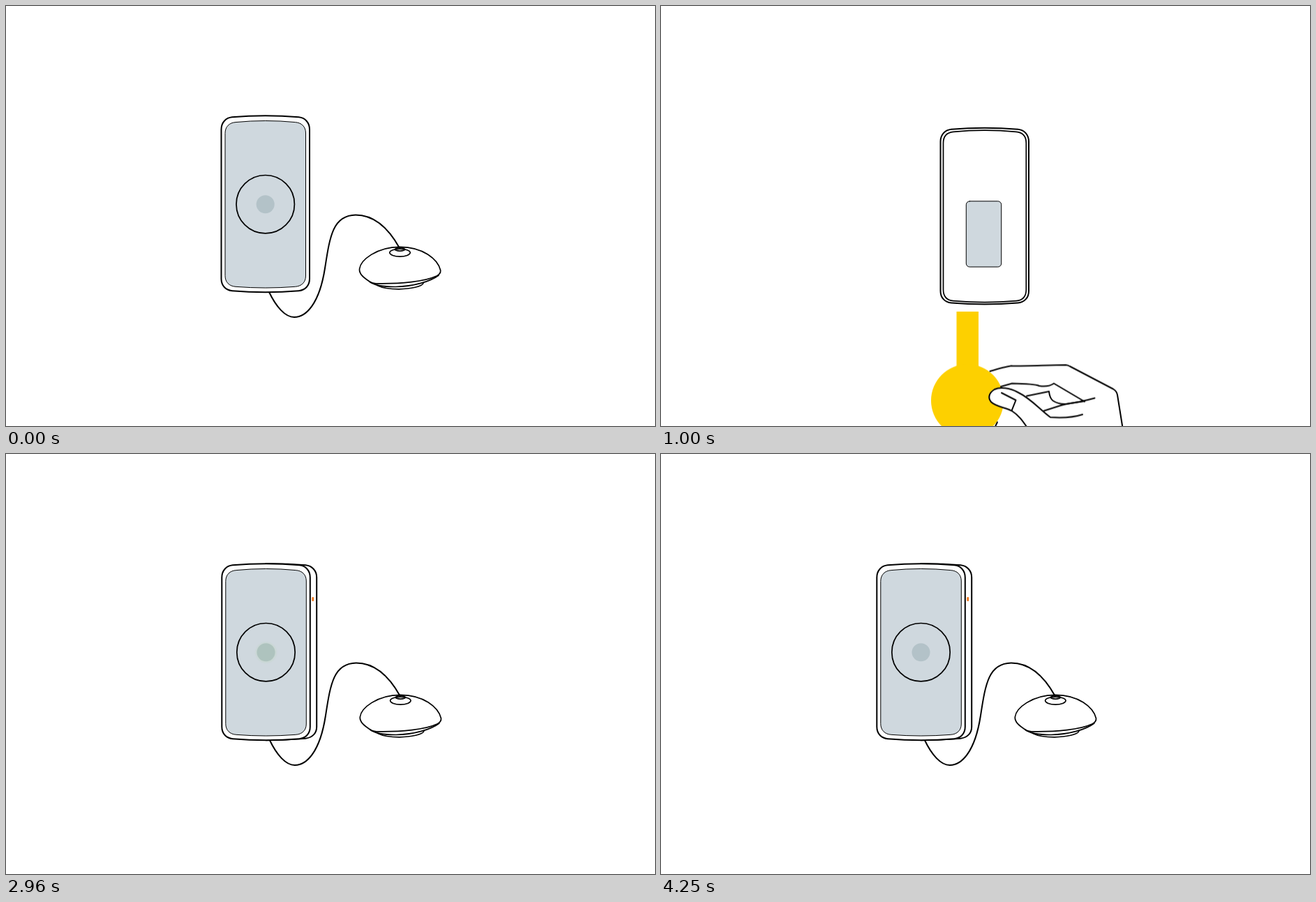
Animation, 930 px wide and 602 px high, one loop 4720 ms. Source, as an HTML page without scripts:

```html
<!DOCTYPE html>
<html lang="en">
<head>
<meta charset="utf-8">
<title>Reset guide</title>
<style>
  html, body { margin: 0; width: 100%; height: 100%; overflow: hidden; background: #fff; }
  svg { display: block; width: 100%; height: 100%; }
  .line { fill: none; stroke: #000; stroke-width: 2; stroke-linecap: round; stroke-linejoin: round; }
  .solid { fill: #fff; }
  .thin { stroke-width: 1; }
  .mid { stroke-width: 1.7; }
  .screen { fill: #cfd8de; }
  .tab { fill: #fdd000; }
  .blue { fill: #00a0e9; }
  text { font: 37px "Liberation Sans", Arial, sans-serif; }

  /* one loop = 4720 ms, drawn in 30 ms steps */
  .anim { animation: 4.72s step-end infinite; }
  #front { animation-name: front; }
  #back { animation-name: back; }
  #hand { animation-name: pull; }
  #side { animation-name: side; }
  #driver { animation-name: poke; }
  #two { animation-name: two; }
  #one { animation-name: one; }
  #unit { animation-name: unit; }
  #glow { animation-name: pulse; }

  @keyframes front {
    0% { opacity: 1; }
    .635% { opacity: 1; animation-timing-function: steps(8, start); }
    5.72%, 100% { opacity: 0; }
  }
  @keyframes back {
    0% { opacity: 0; }
    6.567% { opacity: 1; }
    24.152% { opacity: 1; animation-timing-function: steps(8, start); }
    29.237%, 100% { opacity: 0; }
  }
  @keyframes pull {
    0% { transform: none; opacity: 1; }
    11.652% { transform: none; opacity: 1; animation-timing-function: steps(16, start); }
    21.822% { transform: translateY(79.5px); opacity: 1; }
    22.668%, 100% { transform: translateY(79.5px); opacity: 0; }
  }
  @keyframes side {
    0% { opacity: 0; }
    30.508% { opacity: 0; animation-timing-function: steps(8, start); }
    35.593%, 100% { opacity: 1; }
  }
  @keyframes poke {
    0% { opacity: 0; transform: translate(50px, -20px); }
    37.076% { opacity: 1; transform: translate(50px, -20px); animation-timing-function: steps(9, end); }
    42.796% { opacity: 1; transform: none; }
    62.711%, 100% { opacity: 0; transform: none; }
  }
  @keyframes two {
    0% { opacity: 0; }
    42.796% { opacity: 1; }
    52.754%, 100% { opacity: 0; }
  }
  @keyframes one {
    0% { opacity: 0; }
    52.754% { opacity: 1; }
    62.711%, 100% { opacity: 0; }
  }
  @keyframes unit {
    0% { opacity: 0; }
    42.796% { opacity: 1; }
    62.711%, 100% { opacity: 0; }
  }
  @keyframes pulse {
    0% { opacity: 0; }
    62.711%, 76.694% { opacity: 0; animation-timing-function: steps(11, start); }
    69.703%, 83.686% { opacity: 1; animation-timing-function: steps(11, start); }
    90.677%, 100% { opacity: 0; }
  }
</style>
</head>
<body>
<svg viewBox="0 0 930 602">
  <defs>
    <radialGradient id="green">
      <stop offset=".76" stop-color="#86d35d"/>
      <stop offset="1" stop-color="#86d35d" stop-opacity="0"/>
    </radialGradient>

    <path id="case" d="M308.5 177C308.5 167 315 160.2 324 159.3Q371.7 155.3 419.5 159.3C428.5 160.2 435 167 435 177V391C435 401 428.5 407.3 419.5 408.2Q371.7 412.2 324 408.2C315 407.3 308.5 401 308.5 391Z"/>

    <g id="cable" class="line">
      <path d="M377 410C387 431 400 446 413 446C430 446 449 427 457 376C464 331 468 300 501 299.5C528 299.5 549 320 564 347"/>
    </g>

    <g id="face" class="line">
      <use href="#case" class="solid"/>
      <path class="thin screen" d="M314 182C314 173 320 167.3 329 166.6Q371.7 162.4 414.5 166.6C423.5 167.3 429.5 173 429.5 182V387C429.5 396 423.5 401.6 414.5 402.3Q371.7 405.7 329 402.3C320 401.6 314 396 314 387Z"/>
      <circle class="mid" cx="371.7" cy="284.2" r="41.7"/>
      <circle cx="371.7" cy="284.2" r="13" fill="#b3c2c8" stroke="none"/>
    </g>

    <g id="puck" class="line mid">
      <path d="M532 400.5C540 404.5 550 405.8 563 405.8C580 405.5 596 402 598 397.5"/>
      <path d="M521 395C527 400 540 402.5 558 402.5C584 402 608 395 620 386"/>
      <path d="M506.5 377C508 364 531 345.5 564 345.3C597 345 619 363 622.7 379C623 383 621 385 617 387C600 395 566 398.5 530 397.8Q524 397.5 521 395C512 389 506 384 506.5 377Z"/>
      <ellipse cx="564.5" cy="353.6" rx="14.7" ry="5.5"/>
      <ellipse cx="564.5" cy="348.8" rx="6.8" ry="2.3"/>
    </g>
  </defs>

  <g id="front" class="anim">
    <use href="#cable"/>
    <use href="#face"/>
    <use href="#puck"/>
  </g>

  <g id="back" class="anim">
    <g id="hand" class="anim">
      <path class="tab" d="M423.5 358H455V450H423.5Z"/>
      <circle class="tab" cx="439" cy="486" r="52"/>
      <g class="line" stroke-width="2.2">
        <path d="M471.500 444C485 440 497 437 502 436.300C506 437.200 550 435.500 580 435Q583 435.200 586 437L648 469.500Q653 472.500 654 478L674 603"/>
        <path d="M487 466L503 461.500Q535 462 542 465Q555 467 563 461.500L607 487.500"/>
        <path d="M524 479.500L556 473Q557 483 562 486.500Q570 491.500 580 491Q600 488.500 621.500 482.500"/>
        <path d="M548 501L573 493Q583 490 607 487"/>
        <path d="M482 517C478 524 476.500 531 479 535C482 537.500 493 538 496 536C500 532 499 527 502 526.500C506 529 504 537 507 542C510 547 513 554 517.500 554C522 553 522 546 524.500 542Q526 533 524 526L556 574Q554.500 585 555.500 603"/>
        <path class="solid" stroke="none" d="M470 481C471 471 479 467 489 468C510 471 528 484 548 501L527 528L503 501C486 496 470 490 470 481Z"/>
        <path d="M604 506C590 510.500 572 511 558 510C543 499 530 483 511 474C500 468 486 466 478 470C470 475 468 482 473 488C480 495 494 496 503 501C514 508 520 518 527 528C538 543 548 556 556 573C561 587 563 595 571 603"/>
        <path d="M488 475L508.500 485.500L502.500 500.500"/>
      </g>
    </g>
    <g class="line" transform="translate(92 17.400)">
      <use href="#case" class="solid"/>
      <path class="mid" d="M312.500 179C312.500 169 318 163.800 327 162.900Q371.700 158.600 417 162.900C426 163.800 431.300 169 431.300 179V389C431.300 399 426 404.300 417 405.200Q371.700 409.400 327 405.200C318 404.300 312.500 399 312.500 389Z"/>
      <rect class="thin screen" x="345.300" y="262.400" width="50.400" height="94.200" rx="5"/>
    </g>
  </g>

  <g id="side" class="anim">
    <g transform="translate(.8)">
      <use href="#cable"/>
      <path class="line solid" d="M371.700 157.300Q400 157 428.500 159.300C437.500 160.200 444.400 167 444.400 177V391C444.400 401 437.500 406.500 428.500 407.700Q400 410 371.700 410.200Z"/>
      <use href="#face"/>
      <use href="#puck"/>
    </g>
    <rect x="438.300" y="205" width="2.900" height="6" rx="1.300" fill="#ee7820"/>
    <circle id="glow" class="anim" cx="372.700" cy="284.500" r="16.500" fill="url(#green)"/>
  </g>

  <g id="driver" class="anim" fill="none" stroke="#00a0e9" stroke-linecap="round">
    <path stroke-width="43" d="M489 163L537.500 115"/>
    <path stroke-width="6" d="M445.500 206L478 175"/>
  </g>
  <g class="blue">
    <text id="two" class="anim" x="469" y="234">2</text>
    <text id="one" class="anim" x="469" y="234">1</text>
    <text id="unit" class="anim" x="489.600" y="234">S</text>
  </g>
</svg>
</body>
</html>
```
